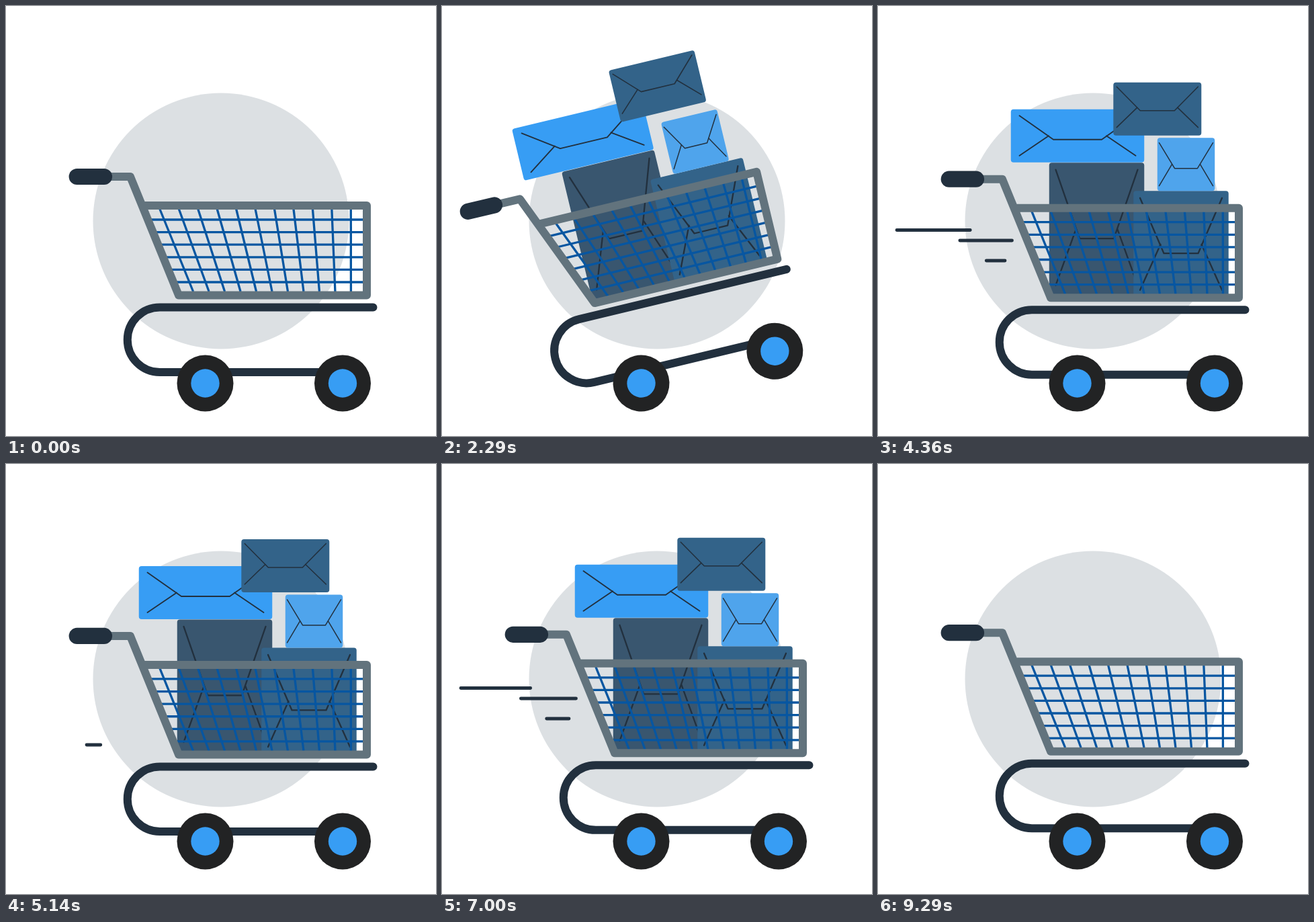
Animation, 640 px wide and 640 px high, one loop 9.37 s. Source, as an HTML page with a canvas:

```html
<!DOCTYPE html>
<html lang="en">
<head>
<meta charset="utf-8">
<title>Shopping cart</title>
<style>
  html, body { margin: 0; width: 100%; height: 100%; overflow: hidden; background: #fff; }
  canvas { display: block; width: 640px; height: 640px; }
</style>
</head>
<body>
<canvas id="stage" width="640" height="640"></canvas>
<script>
const ctx = document.getElementById('stage').getContext('2d');
const LOOP = 9370;
const NAVY = '#22303e', STEEL = '#62737d', MESH = '#0756a1', BLUE = '#379df4';
const REAR = { x: 296.5, y: 561.5 }, FRONT = { x: 501, y: 561.5 };

const clamp = v => Math.max(0, Math.min(1, v));
const smooth = u => u * u * (3 - 2 * u);
const ramp = (t, start, length) => smooth(clamp((t - start) / length));

// Vertical shake of the cart body: [time, offset]
const SHAKE = [
  [0, 0], [280, 3], [560, -2.5], [860, 2], [1040, -1], [1210, 2], [1520, -2.5],
  [1850, 2.5], [2200, -2], [2550, 2], [2900, -2], [3210, 1.8], [3600, -2.5],
  [4000, 1], [4360, 3.7], [4720, -3.2], [5040, 1], [5380, 5.5], [5660, -3],
  [5860, -1], [6200, 1], [6550, -2], [6850, 1], [7200, -2], [7500, 2.5],
  [7760, -2], [8000, 3.3], [8200, 3.8], [8600, -2], [8950, -1.5], [9140, -6],
  [9290, -2.8], [LOOP, 0]
];

// crease: outer x, top y, inner x, inner y, bottom y, meeting x, meeting y
// fall: start, length, height, sideways drift; jolt: push as the cart lands
const PACKAGES = [
  { x: 325.5, y: 328, w: 141.5, h: 197, color: '#39566f', line: 2.3,
    crease: [61, -88, 25.5, 14.5, 84, 31, 1],
    grow: 100, fall: [420, 860, 150, 3], jolt: [-1.4, 5.4], leave: 8480 },
  { x: 451, y: 350, w: 141.5, h: 157, color: '#336389', line: 2.3,
    crease: [61, -68, 25.5, 14.5, 69, 30.5, 1],
    grow: 400, fall: [700, 694, 172, 0], jolt: [-1.6, 4], leave: 8330 },
  { x: 458.5, y: 232, w: 85.5, h: 79, color: '#4fa4ec', line: 1.5,
    crease: [40, -32, 17, 6, 32, 21, 0],
    grow: 764, fall: [1120, 630, 60, -3], jolt: [-1.6, 2.8], leave: 8160 },
  { x: 297, y: 189.5, w: 198.5, h: 79, color: BLUE, line: 1.9,
    crease: [86.5, -30, 36, 5.5, 29.5, 43, 0],
    grow: 814, fall: [1200, 700, 74, 6.5], jolt: [-4, 8], leave: 7990 },
  { x: 415.8, y: 149.5, w: 131, h: 79, color: '#336389', line: 1.6,
    crease: [60.5, -33, 25.5, 2.5, 27.5, 30, -2],
    grow: 1036, fall: [1550, 1000, 66, 46], jolt: [-9.8, 9], leave: 7750 }
];

// Speed lines: left, right, y; each runs half a stroke behind the one before
const STREAKS = [[28, 165, 333.5], [89, 199.5, 349], [52, 189, 379], [120, 230, 418]];
const BURSTS = [2470, 3916, 5157, 6541, 7926];
const STROKE_TIME = 370;

function shakeAt(t) {
  const i = SHAKE.findIndex(([time]) => time > t);
  const [t0, a] = SHAKE[i - 1], [t1, b] = SHAKE[i];
  return a + (b - a) * ramp(t, t0, t1 - t0);
}

function tiltAt(t) {
  const back = Math.pow(1 - ramp(t, 1950, 1340), 1.4);
  return -17.3 * ramp(t, 70, 1470) * back * Math.PI / 180;
}

function polyline(points, color, width) {
  ctx.beginPath();
  points.forEach(([x, y]) => ctx.lineTo(x, y));
  ctx.strokeStyle = color;
  ctx.lineWidth = width;
  ctx.stroke();
}

function disc(x, y, r, color) {
  ctx.beginPath();
  ctx.arc(x, y, r, 0, 2 * Math.PI);
  ctx.fillStyle = color;
  ctx.fill();
}

function drawStreaks(t) {
  for (const start of BURSTS) {
    STREAKS.forEach(([left, right, y], i) => {
      const phase = (t - start) / STROKE_TIME - i * 0.5;
      if (phase <= 0 || phase >= 2) return;
      const span = right - left;
      const a = right - span * clamp(phase);
      const b = right - span * clamp(phase - 1);
      polyline([[a, y], [b, y]], NAVY, 4.8);
    });
  }
}

function drawPackage(p, t) {
  const gone = ramp(t, p.leave, 467);
  const scale = ramp(t, p.grow, 480) * (1 - gone);
  if (scale < 0.005) return;
  const [start, length, height, drift] = p.fall;
  const above = 1 - ramp(t, start, length);
  const push = Math.sin(Math.PI * clamp((t - 2500) / 950));
  ctx.save();
  ctx.translate(p.x + drift * above + p.jolt[0] * push,
                p.y - height * above + p.jolt[1] * push - 6 * gone);
  ctx.scale(scale, scale);
  ctx.beginPath();
  ctx.roundRect(-p.w / 2, -p.h / 2, p.w, p.h, 4);
  ctx.fillStyle = p.color;
  ctx.fill();
  const [ox, top, ix, iy, bottom, mx, my] = p.crease;
  polyline([[-ox, top], [-ix, iy], [ix, iy], [ox, top]], NAVY, p.line);
  for (const side of [-1, 1]) {
    polyline([[side * ox, bottom], [side * mx, my]], NAVY, p.line);
  }
  ctx.restore();
}

function drawBasket() {
  ctx.lineCap = 'butt';
  for (let i = 0; i < 6; i++) {
    const y = 318 + i * 18.6;
    polyline([[185 + (y - 254) * 0.408, y], [537, y]], MESH, 3.3);
  }
  for (let i = 0; i < 11; i++) {
    polyline([[228.8 + i * 28.45, 302], [278.6 + i * 23.48, 425]], MESH, 3.3);
  }
  ctx.lineCap = 'round';
  polyline([[148, 254], [185, 254], [257, 430.5], [537, 430.5], [537, 297], [203, 297]], STEEL, 12);
  polyline([[105.7, 254], [146, 254]], NAVY, 24.2);
}

function drawRail() {
  ctx.beginPath();
  ctx.moveTo(546.5, 448.5);
  ctx.lineTo(229, 448.5);
  ctx.arc(229, 496.75, 48.25, -Math.PI / 2, Math.PI / 2, true);
  ctx.lineTo(FRONT.x, 545);
  ctx.strokeStyle = NAVY;
  ctx.lineWidth = 12;
  ctx.stroke();
}

function draw(t) {
  ctx.fillStyle = '#fff';
  ctx.fillRect(0, 0, 640, 640);
  ctx.lineCap = ctx.lineJoin = 'round';
  disc(320, 320, 190.5, '#dce0e3');
  drawStreaks(t);

  ctx.save();
  ctx.translate(REAR.x, REAR.y);
  ctx.rotate(tiltAt(t));
  ctx.translate(-REAR.x, -REAR.y);

  ctx.save();
  ctx.translate(0, shakeAt(t));
  PACKAGES.forEach(p => drawPackage(p, t));
  drawBasket();
  drawRail();
  ctx.restore();

  for (const { x, y } of [REAR, FRONT]) {
    disc(x, y, 42, '#222324');
    disc(x, y, 21.2, BLUE);
  }
  ctx.restore();
}

const begin = performance.now();
function tick() {
  draw((performance.now() - begin) % LOOP);
  requestAnimationFrame(tick);
}
tick();
</script>
</body>
</html>
```
